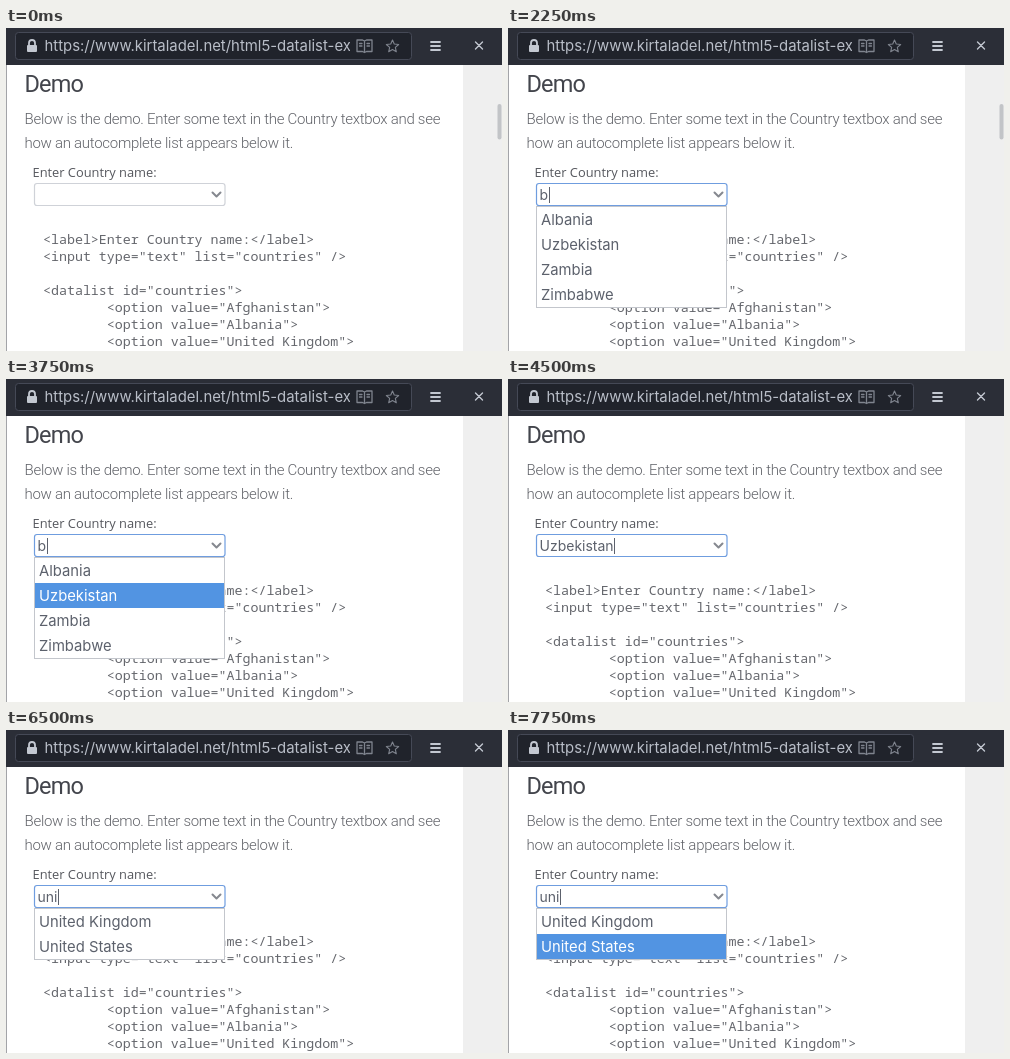
Recreate the animation shown at these times as an HTML page. Size 496x323 px, loop 8 s.

```html
<!DOCTYPE html>
<html lang="en">
<head>
<meta charset="utf-8">
<title>Datalist demo</title>
<style>
  html, body { margin: 0; width: 100%; height: 100%; overflow: hidden; background: #fff; }
  svg { display: block; width: 496px; height: 323px; }
  text { white-space: pre; }
  .ui { font: 14.8px Inter, sans-serif; fill: #5c616c; }
  .url { font-size: 14.9px; fill: #b9bec8; }
  .typed { font-size: 14px; }
  .prose { font: 300 15px Roboto, sans-serif; letter-spacing: -.28px; fill: #606268; }
  .title { font: 400 23.5px Roboto, sans-serif; letter-spacing: -.8px; fill: #43454c; }
  .label { font: 12.85px "Open Sans", sans-serif; fill: #55575d; }
  .code { font: 13.3px "Noto Sans Mono", monospace; fill: #65676d; }
  .line { fill: none; stroke-linecap: round; stroke-linejoin: round; }
</style>
</head>
<body>
<svg viewBox="0 0 496 323">
  <rect width="496" height="323" fill="#fff"/>
  <rect x="457" y="37" width="39" height="286" fill="#efefef"/>
  <rect y="37" width="1" height="286" fill="#a3a4a8"/>

  <rect width="496" height="37" fill="#2b2e37"/>
  <rect x="9.5" y="4.5" width="396" height="27" rx="3" fill="#20232b" stroke="#454956"/>
  <rect x="21" y="17" width="10" height="7" rx="1" fill="#c3c8d1"/>
  <path class="line" d="M23 17v-2a3 3 0 0 1 6 0v2" stroke="#c3c8d1" stroke-width="1.8"/>
  <clipPath id="bar"><rect x="30" y="5" width="314" height="26"/></clipPath>
  <g clip-path="url(#bar)"><text class="ui url" x="38.5" y="23">https://www.kirtaladel.net/html5-datalist-example</text></g>
  <g class="line" stroke="#7f848e" stroke-width="1.3">
    <path d="M351 12h5.5l2 1 2-1h5.5v11.500h-5.500l-2 1-2-1h-5.500zM358.500 13.500v10M353.500 15.500h2.500M353.500 18h2.500M361 15.500h2.500M361 18h2.500"/>
    <path id="star" stroke-width="1.1"/>
  </g>
  <g class="line" stroke="#c3c8d1">
    <path d="M425 14h9M425 18h9M425 22h9" stroke-width="1.8"/>
    <path d="M469.5 14l7 7M476.5 14l-7 7" stroke-width="1.4"/>
  </g>

  <text class="title" x="18.5" y="64">Demo</text>
  <text class="prose" x="18.5" y="96">Below is the demo. Enter some text in the Country textbox and see</text>
  <text class="prose" x="18.5" y="120">how an autocomplete list appears below it.</text>
  <text class="label" x="26.5" y="149">Enter Country name:</text>
  <g id="code"></g>

  <rect id="field" x="28.5" y="155.5" width="190.5" height="22" rx="2.5" fill="#fff"/>
  <path class="line" d="M206.5 164.5l4 4 4-4" stroke="#85888f" stroke-width="2"/>
  <text id="typed" class="ui typed" x="31.5" y="172"></text>
  <rect id="caret" y="159" width="1" height="16" fill="#5c616c"/>

  <g id="menu">
    <rect id="box" x="28.5" y="178.5" width="190" fill="#fff" stroke="#c3c6cc"/>
    <rect id="mark" x="29" width="189" height="25" fill="#5294e2"/>
    <g id="rows"></g>
  </g>
  <rect id="thumb" x="491.5" y="76" width="4" height="35.5" rx="2" fill="#c2c4c7"/>
</svg>
<script>
const LOOP = 8000, ROW = 25, TOP = 179;
const $ = id => document.getElementById(id);
const set = (el, attrs) => { for (const k in attrs) el.setAttribute(k, attrs[k]); };

function addText(parent, cls, x, y, str) {
  const el = document.createElementNS('http://www.w3.org/2000/svg', 'text');
  set(el, { class: cls, x, y });
  el.textContent = str;
  parent.append(el);
  return el;
}

const code = [
  '<label>Enter Country name:</label>',
  '<input type="text" list="countries" />',
  '',
  '<datalist id="countries">',
  ...['Afghanistan', 'Albania', 'United Kingdom'].map(c => `        <option value="${c}">`)
];
code.forEach((s, i) => addText($('code'), 'code', 37, 216 + 17 * i, s));

const points = Array.from({ length: 10 }, (_, i) => {
  const a = i * Math.PI / 5 - Math.PI / 2, r = i % 2 ? 3 : 6.5;
  return (386.5 + r * Math.cos(a)).toFixed(2) + ' ' + (18.5 + r * Math.sin(a)).toFixed(2);
});
set($('star'), { d: 'M' + points.join('L') + 'Z' });

const lists = {
  b: ['Albania', 'Uzbekistan', 'Zambia', 'Zimbabwe'],
  u: ['United Kingdom', 'United States', 'Uruguay', 'Uzbekistan', 'Antigua & Deps', 'Vanuatu', 'Vatican City'],
  un: ['United Kingdom', 'United States']
};
lists.uni = lists.un;

// [start, typed text, highlighted row]
const steps = [
  [0, '', -1], [500, '', -1], [1000, 'b', -1], [3500, 'b', 0], [3750, 'b', 1],
  [4250, 'Uzbekistan', -1], [4750, '', -1], [5250, 'u', -1], [6000, 'un', -1],
  [6250, 'uni', -1], [7000, 'uni', 0], [7250, 'uni', 1]
];
const rows = lists.u.map((_, i) => addText($('rows'), 'ui', 33, 197 + ROW * i, ''));
let shown;

function show([start, typed, picked]) {
  const list = lists[typed] || [];
  const focused = start > 0;
  set($('field'), { stroke: focused ? '#6f9ddf' : '#cfd2d8', 'stroke-width': 1.2 });
  $('typed').textContent = typed;
  set($('caret'), { x: Math.round(32 + $('typed').getComputedTextLength()), opacity: +focused });
  set($('menu'), { visibility: list.length ? 'visible' : 'hidden' });
  set($('box'), { height: ROW * list.length + 1 });
  set($('mark'), { y: TOP + ROW * picked, opacity: picked < 0 ? 0 : 1 });
  rows.forEach((row, i) => {
    row.textContent = list[i] || '';
    row.style.fill = i === picked ? '#fff' : '';
  });
}

function frame() {
  const t = performance.now() % LOOP;
  const step = steps.findLast(s => s[0] <= t);
  if (step !== shown) show(shown = step);
  set($('thumb'), { opacity: Math.max(0, Math.min(1, (3300 - t) / 300)) });
  requestAnimationFrame(frame);
}
frame();
</script>
</body>
</html>
```
